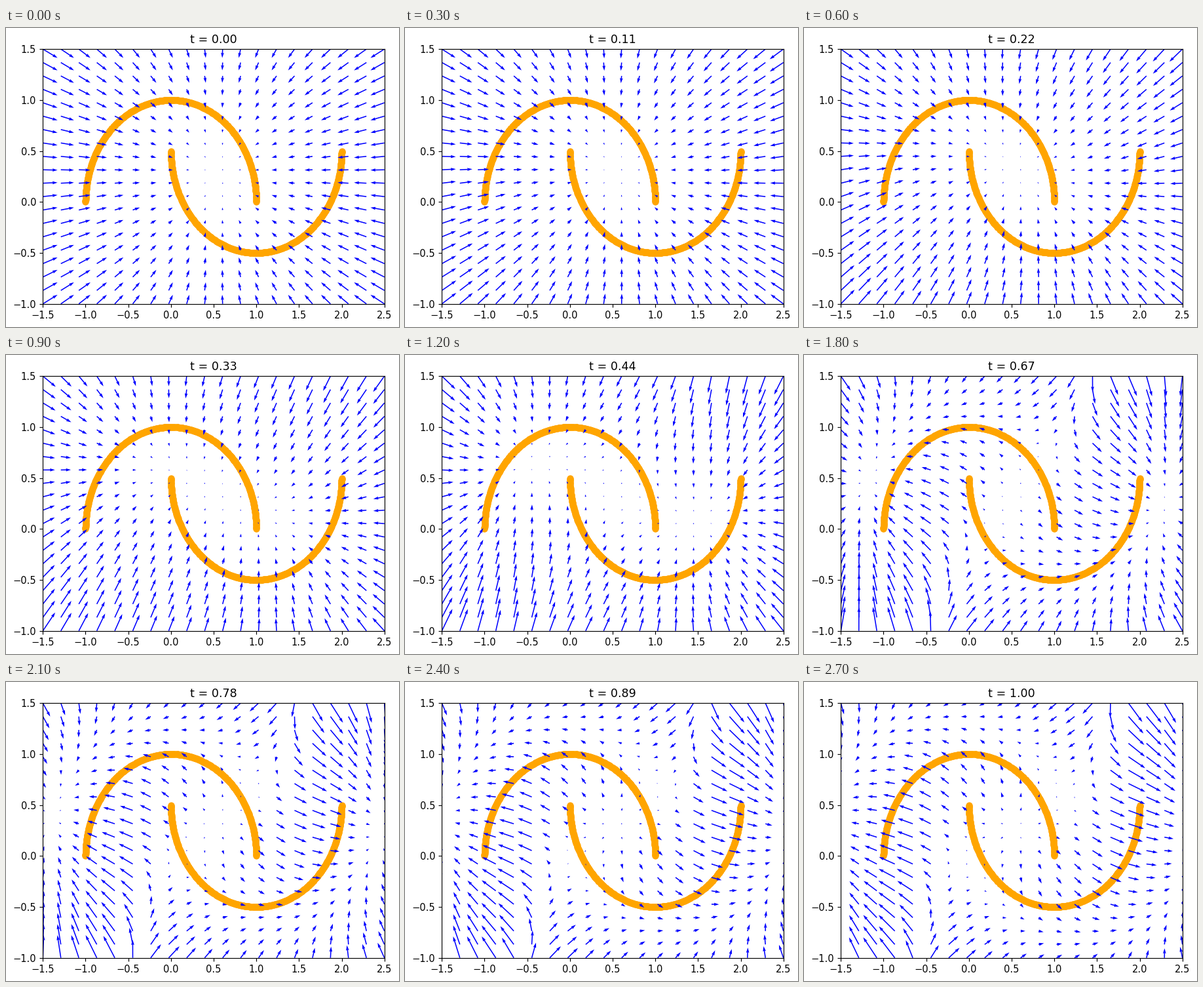
Animation, 600 px wide and 456 px high, one loop 3 s. Source, as a matplotlib script:

```python
import numpy as np
import matplotlib.pyplot as plt
from matplotlib.animation import FuncAnimation

WIDTH, HEIGHT, DPI = 600, 456, 105.25
FRAMES, INTERVAL = 10, 300
NOISE, BLUR, MAX_PULL = 0.75, 0.35, 1.75

plt.rcParams["font.family"] = "DejaVu Sans"

angle = np.linspace(0, np.pi, 400)
upper = np.column_stack([np.cos(angle), np.sin(angle)])
lower = np.column_stack([1 - np.cos(angle), 0.5 - np.sin(angle)])
moons = np.vstack([upper, lower])
targets = moons[::4] - [0.5, 0.25]

grid_x, grid_y = np.meshgrid(np.linspace(-1.5, 2.5, 20), np.linspace(-1, 1.5, 20))
points = np.column_stack([grid_x.ravel(), grid_y.ravel()])


def velocity(t):
    """Smoothed flow that carries a Gaussian cloud onto the two moons."""
    offsets = points - [0.55, 0.27 + 0.1 * np.sin(np.pi * t)]
    variance = (NOISE * (1 - t)) ** 2 + (BLUR * t) ** 2
    pull = 1 / max(1 - t, 1 / MAX_PULL)
    gap = offsets[:, None, :] - t * targets[None, :, :]
    weights = np.exp(-(gap ** 2).sum(axis=2) / (2 * variance))
    weights /= weights.sum(axis=1, keepdims=True)
    expected = weights @ targets
    return (expected - pull * (offsets - t * expected)).T


fig = plt.figure(figsize=((WIDTH + 0.001) / DPI, (HEIGHT + 0.001) / DPI), dpi=DPI,
                 facecolor="white")
ax = fig.add_axes([56.3 / WIDTH, 35.3 / HEIGHT, 521.4 / WIDTH, 388.5 / HEIGHT])
ax.set(xlim=(-1.5, 2.5), ylim=(-1, 1.5))
ax.scatter(*moons.T, color="orange", zorder=1)

u0, v0 = velocity(0)
arrows = ax.quiver(grid_x, grid_y, u0, v0, color="blue", width=0.003, scale=48, zorder=2)
title = ax.set_title("t = 0.00")


def update(frame):
    t = frame / (FRAMES - 1)
    u, v = velocity(t)
    arrows.scale = 36 * np.hypot(u, v).mean()  # keeps the mean arrow length constant
    arrows.set_UVC(u, v)
    title.set_text(f"t = {t:.2f}")
    return arrows, title


animation = FuncAnimation(fig, update, frames=FRAMES, interval=INTERVAL,
                          repeat=True, repeat_delay=0, blit=False)
plt.show()
```
